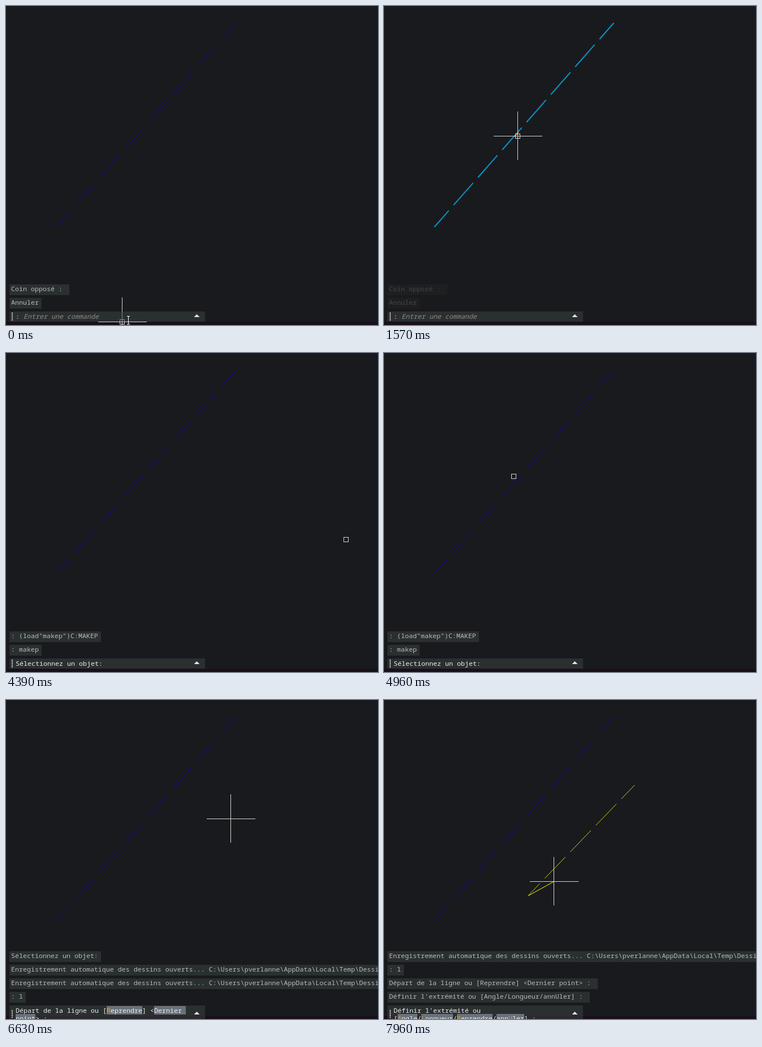
Write an HTML page with a canvas that moves like this. It is 658x565 px and loops after 7990 ms.

```html
<!DOCTYPE html>
<html lang="fr">
<meta charset="utf-8">
<style>
  html, body { margin: 0; width: 100%; height: 100%; overflow: hidden; background: #191a1d; }
  canvas { display: block; }
</style>
<canvas id="stage" width="658" height="565"></canvas>
<script>
const ctx = document.getElementById('stage').getContext('2d');
const LOOP = 7990, CHAR = 7;
const MONO = '11.667px "Noto Sans Mono", monospace';
const PANEL = 'rgba(61,68,69,.5)';

const saved = 'Enregistrement automatique des dessins ouverts... ' +
  'C:\\Users\\pverlanne\\AppData\\Local\\Temp\\Dessin1';
const startAsk = 'Départ de la ligne ou [Reprendre] <Dernier point> : ';
const endAsk = "Définir l'extrémité ou [Angle/Longueur/annUler] : ";

// Prompt markup: {option} is shaded, a * precedes its orange shortcut letter.
const scenes = [
  { at: 0, log: ['Coin opposé : ', 'Annuler'] },
  { at: 4390, log: [': (load"makep")C:MAKEP', ': makep'], ask: ['Sélectionnez un objet:'] },
  { at: 5590, log: [': makep', 'Sélectionnez un objet:', saved, saved] },
  { at: 6360, log: [': makep', 'Sélectionnez un objet:', saved, saved], ask: [': l'] },
  { at: 6460, log: ['Sélectionnez un objet:', saved, saved, ': l'],
    ask: ['Départ de la ligne ou [{*Reprendre}] <{Dernier }', '{point}> :'] },
  { at: 6960, log: [saved, saved, ': l', startAsk],
    ask: ["Définir l'extrémité ou", '[{*Angle}/{*Longueur}/{ann*Uler}] :'] },
  { at: 7690, log: [saved, ': l', startAsk, endAsk],
    ask: ["Définir l'extrémité ou", '[{*Angle}/{*Longueur}/{*Reprendre}/{ann*Uler}] :'] }
];

// Pointer path: time, x, y
const path = [
  [0, 205, 559], [720, 205, 559], [1310, 254, 237], [1500, 254, 237], [1570, 236, 230],
  [1739, 236, 230], [1740, 236, 229], [3289, 236, 229], [3290, 245, 234], [3320, 245, 234],
  [3530, 710, 370], [4389, 710, 340], [4390, 601, 330], [4960, 229, 218], [5140, 229, 218],
  [5200, 234, 225], [5590, 234, 225], [6010, 264, 250], [6220, 325, 254], [6460, 325, 254],
  [6630, 397, 210], [6800, 443, 151], [6950, 443, 151], [7680, 255, 346], [7850, 255, 346],
  [7960, 300, 321]
];

function pointer(t) {
  const i = path.findIndex(p => p[0] > t);
  if (i < 0) return path[path.length - 1].slice(1);
  const [t0, x0, y0] = path[i - 1], [t1, x1, y1] = path[i];
  const u = (t - t0) / (t1 - t0), k = t1 - t0 > 500 ? u * u * (3 - 2 * u) : u;
  return [Math.round(x0 + (x1 - x0) * k), Math.round(y0 + (y1 - y0) * k)];
}

function rect(x, y, w, h, color) {
  ctx.fillStyle = color;
  ctx.fillRect(x, y, w, h);
}

function text(s, x, y, color, font = MONO) {
  ctx.font = font;
  ctx.fillStyle = color;
  ctx.fillText(s, x, y);
}

function line(x0, y0, x1, y1, color, width = 1, dash = [], offset = 0) {
  ctx.strokeStyle = color;
  ctx.lineWidth = width;
  ctx.setLineDash(dash);
  ctx.lineDashOffset = offset;
  ctx.beginPath();
  ctx.moveTo(x0, y0);
  ctx.lineTo(x1, y1);
  ctx.stroke();
  ctx.setLineDash([]);
}

function box(x, y, w, h, color) {
  ctx.strokeStyle = color;
  ctx.lineWidth = 1;
  ctx.strokeRect(x + .5, y + .5, w - 1, h - 1);
}

function drawLines(t, x, y) {
  const hot = t >= 1540 && t < 3320 || t >= 5620 && t < 6040;
  if (hot) line(406.5, 30, 89, 391.5, '#0596c8', 2, [52.4, 12.8], 14.1);
  else line(406.5, 30.5, 91, 389, '#0000c0', 1, [47, 18.2], 11.5);
  if (t >= 1570 && t < 1740) line(231, 231, 238, 223.5, '#b9562e', 2);
  if (t >= 7690) line(443, 151, 255, 346.5, '#d2d21c', 1, [52.4, 12.8], 19.2);
  if (t >= 6960) {
    const [fx, fy] = t < 7690 ? [443, 151] : [255, 346];
    line(fx + .5, fy + .5, x + .5, y + .5, '#ffff00');
  }
}

function drawPointer(t, x, y) {
  const picking = t >= 4390 && t < 5590, drawing = t >= 6460;
  const color = '#d4d4cf';
  if (!picking) {
    rect(x - 42, y, 86, 1, color);
    rect(x, y - 43, 1, 86, color);
  }
  if (!drawing) box(x - 4, y - 4, 9, 9, color);
}

function drawTip() {
  const font = '11px Roboto, sans-serif', white = '#f4f4f4';
  rect(246, 195, 155, 77, '#191a1d');
  rect(247, 213, 153, 58, '#292c31');
  for (const y of [230, 248, 266]) rect(247, y, 153, 1, '#34373d');
  rect(301, 213, 1, 54, '#34373d');
  box(246, 195, 155, 77, '#66696e');
  text('Ligne', 248, 209, white, font);
  line(390, 201, 395, 206, white);
  line(395, 201, 390, 206, white);
  ['Couleur', 'Calque', 'Longueur'].forEach((s, i) => text(s, 251, 226 + 18 * i, white, font));
  rect(308, 215, 13, 13, '#0000ff');
  box(308, 215, 13, 13, '#000');
  text('ParCalque', 326, 225, white, font);
  text('E-FON-SERVITUDE', 305, 244, white, font);
  text('13.7987 m', 306, 262, white, font);
}

function drawLog(rows, alpha) {
  ctx.globalAlpha = alpha;
  rows.forEach((s, i) => {
    const y = 517 - 24 * (rows.length - 1 - i);
    rect(6, y, s.length * CHAR + 8, 19, PANEL);
    text(s, 9, y + 12, '#bababa');
  });
  ctx.globalAlpha = 1;
}

function drawAsk(markup, x, y) {
  let shaded = false, key = false;
  for (const c of markup) {
    if (c === '{' || c === '}') shaded = c === '{';
    else if (c === '*') key = true;
    else {
      if (shaded) rect(x, y - 12, CHAR, 15, '#69727c');
      text(c, x, y, key ? '#e0a020' : '#ececec');
      key = false;
      x += CHAR;
    }
  }
}

function drawBar(ask) {
  const shift = ask && ask.length > 1 ? 6 : 0;
  rect(6, 541, 346, shift ? 24 : 18, PANEL);
  for (let y = 543; y < 557; y += 3) rect(10, y + shift, 2, 2, '#c4c4c4');
  if (ask) ask.forEach((s, i) => drawAsk(s, 17, 554 + 14 * i));
  else {
    text(':', 17, 554, '#d8d8d8');
    text('Entrer une commande', 31, 554, '#8b8b88', 'italic ' + MONO);
  }
  ctx.fillStyle = '#e4e4e4';
  ctx.beginPath();
  ctx.moveTo(332.5, 551 + shift);
  ctx.lineTo(337.5, 546 + shift);
  ctx.lineTo(342.5, 551 + shift);
  ctx.fill();
}

function drawTextCaret() {
  rect(216, 550, 1, 13, '#fff');
  rect(214, 549, 5, 1, '#fff');
  rect(214, 563, 5, 1, '#fff');
}

function draw(t) {
  const scene = scenes.filter(s => s.at <= t).pop();
  const [x, y] = pointer(t);
  const fade = t < 4390 ? 1 - Math.min(7.85, Math.floor((t + 60) / 270)) * .125 : 1;
  rect(0, 0, 658, 565, '#191a1d');
  rect(0, 560, 658, 5, '#180f1b');
  drawLines(t, x, y);
  drawPointer(t, x, y);
  if (t >= 1740 && t < 3320) drawTip();
  drawLog(scene.log, fade);
  drawBar(scene.ask);
  if (t < 720) drawTextCaret();
}

function tick() {
  draw(performance.now() % LOOP);
  requestAnimationFrame(tick);
}
tick();
</script>
</html>
```
